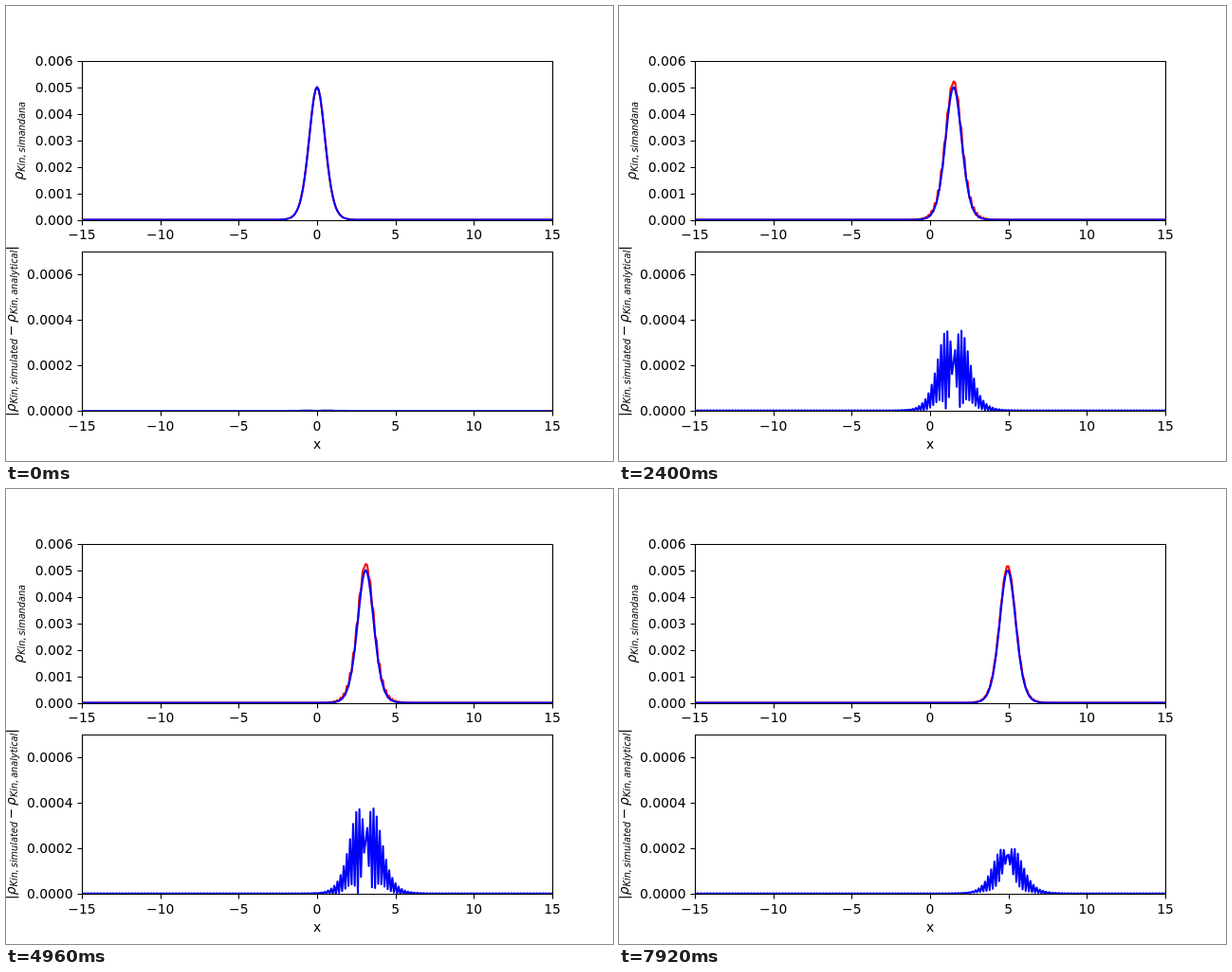
These frames come from a looping animation (640 px wide and 480 px high, 8000 ms). An HTML page:

```html
<!DOCTYPE html>
<html lang="en">
<head>
<meta charset="utf-8">
<title>Kink kinetic energy density</title>
<style>
  html, body { margin: 0; width: 100%; height: 100%; overflow: hidden; background: #fff; }
  svg { display: block; width: 640px; height: 480px; }
  text { font: 13.89px "DejaVu Sans", sans-serif; fill: #000; }
  .it { font-style: italic; }
  .sub { font-style: italic; font-size: 9.72px; }
  .axis { fill: none; stroke: #000; stroke-width: 1.11; }
  .curve { fill: none; stroke-width: 2.083; stroke-linejoin: round; stroke-linecap: square; }
</style>
</head>
<body>
<svg viewBox="0 0 640 480">
  <clipPath id="top"><rect x="80" y="58" width="496" height="168"/></clipPath>
  <clipPath id="low"><rect x="80" y="259" width="496" height="168"/></clipPath>
  <g clip-path="url(#top)">
    <path id="sim" class="curve" stroke="#f00"/>
    <path id="ana" class="curve" stroke="#00f"/>
  </g>
  <g clip-path="url(#low)"><path id="err" class="curve" stroke="#00f"/></g>
  <g id="axes"></g>
  <text x="328" y="467" text-anchor="middle">x</text>
  <text transform="translate(18 142.3) rotate(-90)" text-anchor="middle"><tspan class="it">ρ</tspan><tspan class="sub" dy="2.2">Kin,</tspan><tspan class="sub" dx="1.9">simandana</tspan></text>
  <text transform="translate(9.5 343) rotate(-90)" text-anchor="middle">|<tspan class="it">ρ</tspan><tspan class="sub" dy="2.2">Kin,</tspan><tspan class="sub" dx="1.9">simulated</tspan><tspan dx="2.8" dy="-2.2">−</tspan><tspan class="it" dx="2.8">ρ</tspan><tspan class="sub" dy="2.2">Kin,</tspan><tspan class="sub" dx="1.9">analytical</tspan><tspan dy="-2.2">|</tspan></text>
</svg>
<script>
const STEP = 80, COUNT = 100;
const $ = id => document.getElementById(id);
const px = x => 328 + x * 496 / 30;
const topY = v => 225.6 - v * 28000;
const lowY = v => 427.2 - v * 240000;
const snap = v => Math.floor(v + 0.5) + 0.5;

// step, smooth error, lattice ripple (both in units of 1e-5)
const keys = [
  [0, 0, 0], [8, 18, 22], [21, 14, 42], [38, 28, 63], [53, 21, 68],
  [71, 26, 42], [87, 19, 11], [99, 16, -19]
];

function levels(k) {
  let i = 1;
  while (keys[i][0] < k) i++;
  const a = keys[i - 1], b = keys[i], f = (k - a[0]) / (b[0] - a[0]);
  return [1, 2].map(j => (a[j] + (b[j] - a[j]) * f) * 1e-5);
}

function text(x, y, s, anchor) {
  return `<text x="${x}" y="${y}" text-anchor="${anchor}">${s}</text>`;
}

function axes(top, bottom, y, ticks, digits) {
  const t = snap(top), b = snap(bottom);
  let d = `M80.5 ${t}H576.5V${b}H80.5Z`, labels = "";
  for (let v = -15; v <= 15; v += 5) {
    d += `M${snap(px(v))} ${b}v5`;
    labels += text(px(v), Math.round(bottom + 20.5), String(v).replace("-", "−"), "middle");
  }
  for (const v of ticks) {
    d += `M80.5 ${snap(y(v))}h-5`;
    labels += text(70.5, Math.round(y(v) + 5.1), v.toFixed(digits), "end");
  }
  return `<path class="axis" d="${d}"/>${labels}`;
}

$("axes").innerHTML =
  axes(57.6, 225.6, topY, [0, 1, 2, 3, 4, 5, 6].map(n => n / 1000), 3) +
  axes(259.2, 427.2, lowY, [0, 2, 4, 6].map(n => n / 10000), 4);

function draw(k) {
  const [smooth, ripple] = levels(k);
  const flip = k % 2 ? -1 : 1;
  const sim = [], ana = [], err = [];
  for (let i = -150; i <= 150; i++) {
    const x = i / 10, u = x - 0.05 * k;
    const sech = 1 / Math.cosh(u), tanh = Math.tanh(u);
    const odd = i % 2 ? -1 : 1;
    const rho = 0.005 * sech ** 4;
    const start = k ? 1.5e-6 * (1 + odd) : 6e-6 * Math.abs(tanh) * sech ** 3;
    const e = smooth * sech ** 2 + odd * flip * ripple * tanh * sech ** 2.5 + start;
    const at = y => px(x).toFixed(2) + " " + y.toFixed(2);
    sim.push(at(topY(rho + e)));
    ana.push(at(topY(rho)));
    err.push(at(lowY(Math.abs(e))));
  }
  $("sim").setAttribute("d", "M" + sim.join("L"));
  $("ana").setAttribute("d", "M" + ana.join("L"));
  $("err").setAttribute("d", "M" + err.join("L"));
}

let shown = -1;
const begin = performance.now();
function tick() {
  const k = Math.floor((performance.now() - begin) / STEP) % COUNT;
  if (k !== shown) draw(shown = k);
  requestAnimationFrame(tick);
}
tick();
</script>
</body>
</html>
```
